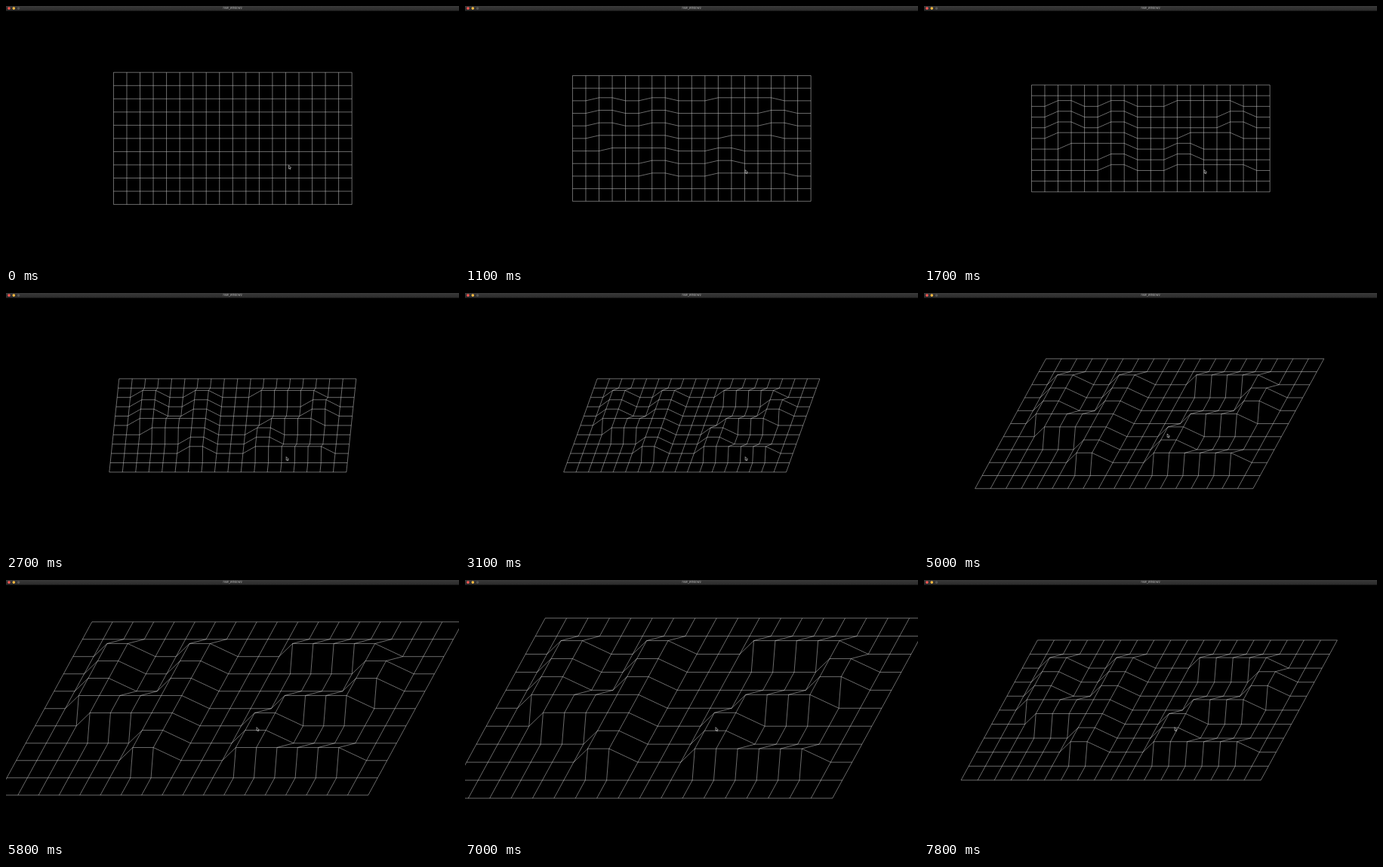
Write an HTML page with a canvas that moves like this. It is 600 px wide and 344 px high and loops after 8 s.

```html
<!DOCTYPE html>
<html lang="en">
<head>
<meta charset="utf-8">
<title>Wireframe</title>
<style>
  html, body { margin: 0; width: 100%; height: 100%; overflow: hidden; background: #000; }
  canvas { display: block; width: 600px; height: 344px; }
</style>
</head>
<body>
<canvas id="stage" width="600" height="344"></canvas>
<script>
const ctx = document.getElementById('stage').getContext('2d');
const LOOP = 8000, TICK = 100;
const COLS = 19, ROWS = 11;
const CELL = 17.54, RAISE = 0.75;
const STEP = 3 * Math.PI / 180, REPEAT = 90;

// Raised blocks that spell "42"
const BLOCKS = [
  { x: [2, 3], y: [2, 5] }, { x: [3, 7], y: [5, 6] }, { x: [6, 7], y: [2, 8] },
  { x: [11, 15], y: [2, 2] }, { x: [15, 16], y: [3, 4] }, { x: [12, 15], y: [5, 5] },
  { x: [11, 12], y: [6, 7] }, { x: [11, 16], y: [8, 8] }
];

// Scroll gestures: a change of cell size, with an optional ease-out power
const SCROLLS = [
  { at: 3500, span: 700, by: 3.1 },
  { at: 4800, span: 700, by: 8.76, power: 1.66 },
  { at: 5600, span: 200, by: 3.14 },
  { at: 6000, span: 300, by: 4.36 },
  { at: 6900, span: 200, by: -5.65, power: 1.13 },
  { at: 7200, span: 300, by: -3.05 },
  { at: 7700, span: 100, by: -1.9 }
];

const POINTER = { x: 374.4, y: 211.6 };
const MOVES = [
  { at: 0, span: 200, dx: -3.2, dy: 6 },
  { at: 3600, span: 600, dx: -49.7, dy: -32.6 },
  { at: 4400, span: 200, dx: 0.7, dy: 2 },
  { at: 5000, span: 300, dx: 9.8, dy: 8.6 }
];

function progress(t, { at, span, power = 1 }) {
  const k = Math.min(1, Math.max(0, (t - at) / span));
  return 1 - (1 - k) ** power;
}

const total = (t, list, key) => list.reduce((sum, m) => sum + m[key] * progress(t, m), 0);
const within = (v, [lo, hi]) => v >= lo && v <= hi;
const raised = (col, row) => BLOCKS.some(b => within(col, b.x) && within(row, b.y));

// A held key: one press, a delay, then steady repeats
function heldAngle(t, first, repeat, limit) {
  if (t < first) return 0;
  const repeats = Math.max(0, Math.floor((t - repeat) / REPEAT) + 1);
  return Math.min(limit, 1 + repeats) * STEP;
}

function projector(t) {
  const growth = total(t, SCROLLS, 'by'), cell = CELL + growth;
  const a = heldAngle(t, 300, 727, 15), b = heldAngle(t, 2200, 2620, 11);
  const sinA = Math.sin(a), cosA = Math.cos(a), sinB = Math.sin(b), cosB = Math.cos(b);
  const cx = 300.3 - 0.235 * growth, cy = 175.9 - 0.345 * growth;
  return (col, row) => {
    const x = (col - (COLS - 1) / 2) * cell;
    const y = (row - (ROWS - 1) / 2) * cell;
    const z = raised(col, row) ? RAISE * cell : 0;
    const depth = y * sinA + z * cosA;
    return [cx + x * cosB - depth * sinB, cy + y * cosA - z * sinA];
  };
}

function drawGrid(t) {
  const project = projector(t);
  ctx.beginPath();
  for (let r = 0; r < ROWS; r++)
    for (let c = 0; c < COLS; c++) ctx[c ? 'lineTo' : 'moveTo'](...project(c, r));
  for (let c = 0; c < COLS; c++)
    for (let r = 0; r < ROWS; r++) ctx[r ? 'lineTo' : 'moveTo'](...project(c, r));
  ctx.strokeStyle = '#fff';
  ctx.lineWidth = 0.42;
  ctx.lineJoin = 'round';
  ctx.stroke();
}

function drawPointer(t) {
  ctx.save();
  ctx.translate(POINTER.x + total(t, MOVES, 'dx'), POINTER.y + total(t, MOVES, 'dy'));
  const outline = new Path2D('M0 0V4.6L1 3.7L1.8 5.4L2.5 5.1L1.8 3.4L3.2 3.3Z');
  ctx.fillStyle = '#000';
  ctx.fill(outline);
  ctx.strokeStyle = '#ddd';
  ctx.lineWidth = 0.6;
  ctx.stroke(outline);
  ctx.restore();
}

function drawTitleBar() {
  const shade = ctx.createLinearGradient(0, 0, 0, 6.5);
  shade.addColorStop(0, '#3a3a3a');
  shade.addColorStop(1, '#2a2a2a');
  ctx.fillStyle = shade;
  ctx.fillRect(0, 0, 600, 6.5);
  ['#fc5753', '#fdbc40', '#555'].forEach((color, i) => {
    ctx.fillStyle = color;
    ctx.beginPath();
    ctx.arc(4 + i * 6.3, 3.1, 1.8, 0, Math.PI * 2);
    ctx.fill();
  });
  ctx.fillStyle = '#b4b4b4';
  ctx.font = '3.8px Inter, sans-serif';
  ctx.textAlign = 'center';
  ctx.fillText('new_window2', 300.2, 4.4);
}

function render(now) {
  const t = Math.floor((now % LOOP) / TICK) * TICK;
  ctx.fillStyle = '#000';
  ctx.fillRect(0, 0, 600, 344);
  drawGrid(t);
  drawTitleBar();
  drawPointer(t);
}

let start;
function frame(now) {
  if (start === undefined) start = now;
  render(now - start);
  requestAnimationFrame(frame);
}
render(0);
requestAnimationFrame(frame);
</script>
</body>
</html>
```
